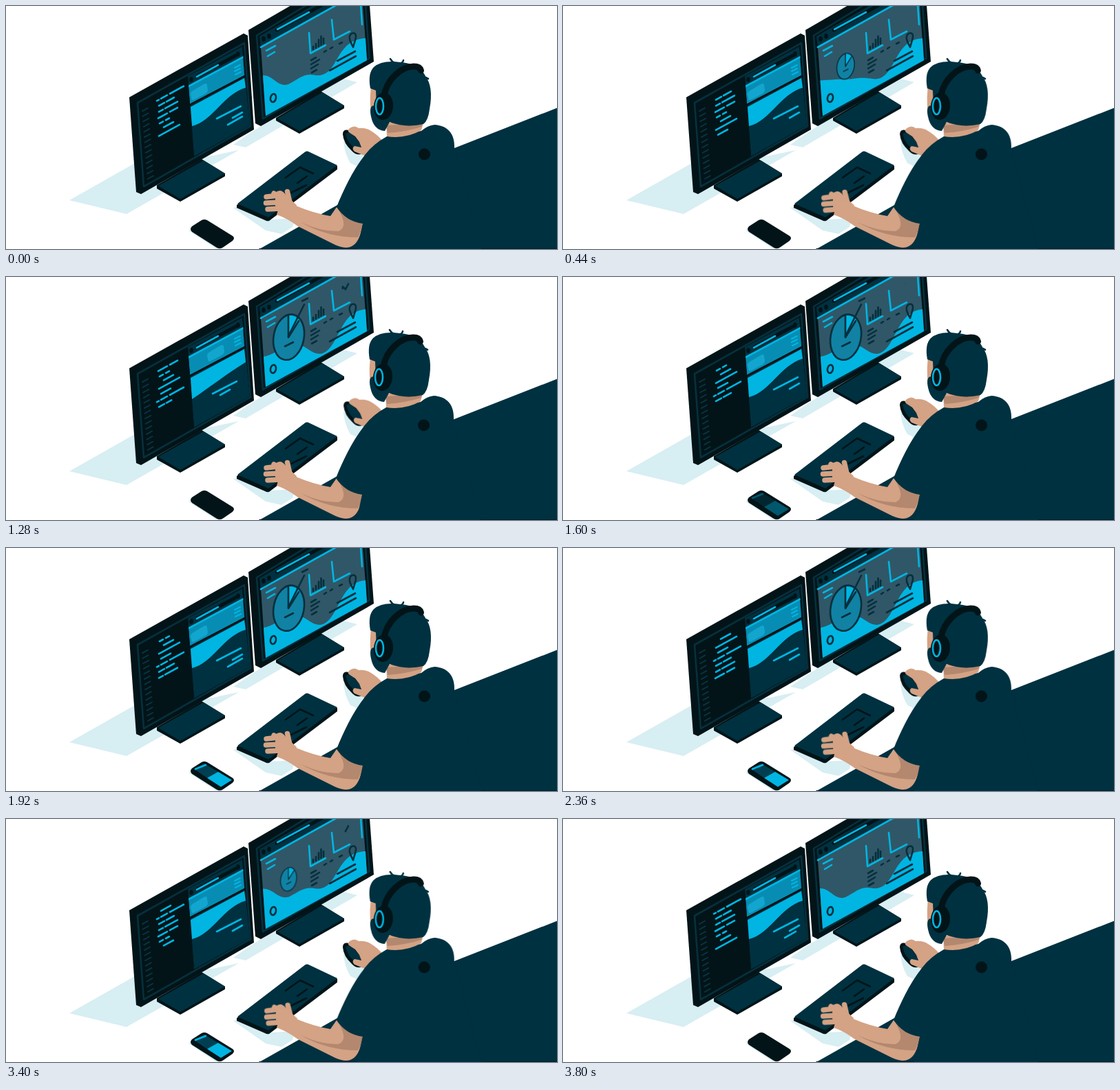
These frames come from a looping animation (800 px wide and 354 px high, 3.84 s). An HTML page:

```html
<!DOCTYPE html>
<html lang="en">
<head>
<meta charset="utf-8">
<title>Developer at work</title>
<style>
  html, body { margin: 0; width: 100%; height: 100%; overflow: hidden; background: #fff; }
  svg { display: block; width: 100%; height: 100%; }
  .navy { fill: #003140; }
  .ink { fill: #021418; }
  .cyan { fill: #00b5e2; }
  .shade { fill: #d7eef3; }
  .skin { fill: #d4a284; }
  .dim { fill: #b3886f; }
  .line { fill: none; stroke-linecap: round; stroke-linejoin: round; stroke-width: 2.6; }
  .c { stroke: #00b5e2; }
  .k { stroke: #021418; }
  .n { stroke: #06303e; }
  .s { stroke: #d4a284; }

  .card, .hero, .text path, .tick, .mouse, .body { animation: 1920ms infinite ease-in-out; }
  .card { animation-name: card; }
  .hero { animation-name: hero; }
  .text path { stroke-dasharray: 100; }
  .text .t1 { animation-name: t1; }
  .text .t2 { animation-name: t2; }
  .text .t3 { animation-name: t3; }
  .tick { stroke-dasharray: 100 300; animation-name: tick; animation-timing-function: linear; }
  .mouse { animation-name: mouse; }
  .body { animation-name: sway; }
  .sea { animation: sea 3840ms infinite ease-in-out; }
  .typing { transform-origin: 425px 300px; animation: typing 320ms infinite ease-in-out; }
  .pie { transform-origin: 410px 88px; animation: pie 3840ms infinite ease-in-out; }
  .lead, .tag { stroke-dasharray: 100; animation: lead 3840ms infinite ease-in-out; }
  .tag { animation-name: tag; }
  .lit { animation: lit 3840ms infinite linear; }

  @keyframes card { 0%, 23%, 77%, 100% { transform: none; } 37%, 68% { transform: translate(24px, -14px); } }
  @keyframes hero {
    0%, 23%, 77%, 100% { d: path("M268 147L346 105L348 119C316 128 300 168 270 175Z"); }
    37%, 68% { d: path("M268 147L346 105L348 124C322 140 298 159 270 178Z"); }
  }
  @keyframes t1 { 0%, 23%, 77%, 100% { transform: none; } 40%, 46% { transform: translate(-3px, 2px); } 67% { transform: translate(-6px, 6px); } }
  @keyframes t2 { 0%, 23%, 77%, 100% { transform: none; } 40%, 67% { transform: translate(-18px, 9px); } }
  @keyframes t3 { 0% { stroke-dashoffset: 0; } 20%, 94% { stroke-dashoffset: 101; opacity: 0; } 95% { opacity: 1; } 100% { stroke-dashoffset: 0; } }
  @keyframes tick {
    0%, 32% { stroke-dasharray: 0 300; stroke-dashoffset: 1; opacity: 0; }
    33% { stroke-dasharray: 0 300; stroke-dashoffset: 0; opacity: 1; }
    45% { stroke-dasharray: 60 300; stroke-dashoffset: 0; }
    66% { stroke-dasharray: 38 300; stroke-dashoffset: -62; opacity: 1; }
    77% { stroke-dasharray: 20 300; stroke-dashoffset: -80; opacity: 1; }
    84%, 100% { stroke-dasharray: 0 300; stroke-dashoffset: -101; opacity: 0; }
  }
  @keyframes sea {
    0%, 3%, 90%, 100% { d: path("M373 101C389 101 394 119 410 114C426 106 432 97 450 101C484 104 476 49 522 47L524 79L377 160Z"); }
    20%, 80% { d: path("M374 116C390 114 408 94 426 99C438 102 444 112 456 112C484 108 482 50 522 47L524 79L377 160Z"); }
  }
  @keyframes mouse { 0%, 20%, 77%, 100% { transform: none; } 44%, 47% { transform: translate(4px, 1px); } 62% { transform: translate(1.5px, 1px); } }
  @keyframes sway { 0%, 14%, 84%, 100% { transform: none; } 44%, 66% { transform: translate(-1px, 0); } }
  @keyframes typing { 0%, 100% { transform: none; } 50% { transform: translate(1.5px, .5px) rotate(-1.5deg); } }
  @keyframes pie { 0%, 5% { transform: scale(0); } 17%, 84% { transform: none; } 88.5% { transform: scale(.52); } 94%, 100% { transform: scale(0); } }
  @keyframes lead { 0%, 14% { stroke-dashoffset: 101; opacity: 0; } 15% { opacity: 1; } 22%, 70% { stroke-dashoffset: 0; } 79% { opacity: 1; } 82%, 100% { stroke-dashoffset: 101; opacity: 0; } }
  @keyframes tag { 0%, 22% { stroke-dashoffset: 101; opacity: 0; } 23% { opacity: 1; } 30%, 64% { stroke-dashoffset: 0; } 70% { opacity: 1; } 71%, 100% { stroke-dashoffset: 101; opacity: 0; } }
  @keyframes lit { 0%, 40% { opacity: 0; } 44%, 92% { opacity: 1; } 96%, 100% { opacity: 0; } }
</style>
</head>
<body>
<svg viewBox="0 0 800 354" preserveAspectRatio="none">
  <defs>
    <clipPath id="page"><path d="M264 102L343 59L354 174L273 219Z"/></clipPath>
  </defs>

  <g class="shade">
    <path d="M92 283L187 229L300 218L338 210L175 303Z"/>
    <path d="M330 202L362 180L490 106L510 111L348 206Z"/>
    <path d="M330 294L345 291L384 311L420 309L416 322L400 332L377 327Z"/>
    <path d="M265 327L272 326L314 353L304 353Z"/>
    <path d="M490 196L520 216L511 234L500 229Q491 214 490 196Z"/>
  </g>

  <!-- stands -->
  <path class="ink" d="M219 261L284 223L318 244V248L253 285L219 266Z"/>
  <path class="navy" d="M221 262L287 225L318 244L253 281Z"/>
  <path class="ink" d="M392 163L457 124L491 145V149L426 186L392 167Z"/>
  <path class="navy" d="M394 164L459 126L491 145L426 182Z"/>

  <!-- left monitor -->
  <path class="ink" d="M179 133L345 40L351 43L360 180L196 274L189 271Z"/>
  <path class="line n" stroke-linejoin="miter" d="M191 141L346 54L355 175L200 263Z"/>
  <g id="gutter" class="line" stroke="#0a323f" style="stroke-width:2"></g>
  <path id="code" class="line c"/>
  <g clip-path="url(#page)">
    <path class="navy" d="M264 102L343 59L354 174L273 219Z"/>
    <path fill="#078db3" d="M265 117L344 74L346 101L267 143Z"/>
    <path class="card" fill="#12a6cf" d="M272 123L287 114Q292 111 292 116L293 122Q293 126 289 128L274 136Q269 139 269 133L268 129Q268 125 272 123Z"/>
    <path class="hero cyan" d="M268 147L346 105L348 119C316 128 300 168 270 175Z"/>
    <path class="line k" d="M267 144L347 102"/>
    <path class="line c" d="M265 117L345 74"/>
    <path class="line c" style="stroke-width:2" d="M332 90L340 86M332 95L340 91M333 100L341 96"/>
  </g>
  <path class="line k" style="stroke-width:5" d="M278 102L334 72"/>
  <path class="line c" d="M277 103L308 86"/>
  <g class="ink"><ellipse cx="269" cy="107" rx="2.800" ry="3.800"/><ellipse cx="337" cy="70" rx="2.800" ry="3.800"/></g>
  <g class="text line c">
    <path class="t1" pathLength="100" d="M306 164L341 146"/>
    <path class="t2" pathLength="100" d="M329 163L343 155"/>
    <path class="t3" pathLength="100" d="M322 173L343 161"/>
  </g>

  <!-- right monitor -->
  <path class="ink" d="M352 35L414 -1H528L534 81L370 175L362 171Z"/>
  <path class="line n" d="M364 43L436 -1M522 -1L527.500 76L373 164L364 43"/>
  <path class="navy" d="M368 44L446 -1H518L522 60L371 70Z"/>
  <path fill="#305767" d="M370 60L479 -1H518L524 79L377 160Z"/>
  <path class="sea cyan" d="M373 101C389 101 394 119 410 114C426 106 432 97 450 101C484 104 476 49 522 47L524 79L377 160Z"/>
  <path class="line c" d="M370 60L479 -1"/>
  <path class="line k" style="stroke-width:5" d="M393 35L458 -1"/>
  <path class="line c" d="M394 34L440 9"/>
  <g class="ink"><ellipse cx="374" cy="48" rx="2.800" ry="3.800"/><ellipse cx="382" cy="44" rx="2.800" ry="3.800"/></g>
  <path class="line c" d="M378 65L391 58M380 73L390 67M515 -2L517 27M440 39L442 69L464 57M473 20L476 49L499 37"/>
  <path class="line n" d="M446 63V59M450 61V55M454 59V49M457.500 57V44M461 55V47"/>
  <path class="line n" d="M443 79L450 75M443 85L455 78M443 91L453 85M444 97L451 93M462 67L465 65M471 62L474 60M484 55L488 53"/>
  <path class="line n" d="M481 80L507 66M470 94L508 73"/>
  <path class="line n" d="M504 60C500 52 498 48 499 44C501 38 508 38 508 44C508 49 505 55 504 60Z"/>
  <ellipse class="line n" cx="388" cy="134" rx="4" ry="6" transform="rotate(12 388 134)"/>
  <path class="tick line n" pathLength="100" d="M482 35L486 40L489 14L493 18L497 10"/>
  <g class="pie">
    <ellipse cx="410.500" cy="87.500" rx="22" ry="33.500" fill="#1182a4" stroke="#06303e" stroke-width="2.600" transform="rotate(11 410 88)"/>
    <path class="cyan" d="M410 88L410 56Q420 55 426 64Z"/>
    <path class="line n" d="M410 88L410 56M410 88L425 64M405 101L417 95"/>
  </g>
  <path class="lead line n" pathLength="100" d="M410 86L433 40"/>
  <path class="tag line n" pathLength="100" d="M430 35L438 31"/>

  <!-- keyboard and phone -->
  <path class="ink" d="M335 290L434 213L481 233V238L382 313Q379 314 376 312L335 294Z"/>
  <path class="navy" d="M336 288L435 212Q437 211 439 212L481 232L381 308Z"/>
  <path class="line k" d="M406 250L427 235L446 244M414 272L436 261M423 258L437 248"/>
  <path class="ink" d="M270 321L284 312Q288 310 292 312L329 335Q333 338 329 342L316 351Q311 355 306 352L270 329Q266 325 270 321Z"/>
  <g class="lit">
    <path fill="#003f52" d="M273 322L288 314L308 326L292 335Z"/>
    <path class="cyan" d="M292 335L308 326L328 338L312 348Z"/>
    <path class="line c" d="M275 322L290 316"/>
  </g>

  <!-- floor -->
  <path class="navy" d="M368 354L481 290L600 226L651 207L800 148.500V354Z"/>
  <path fill="#011e29" d="M368 353H800V354H367Z"/>

  <!-- mouse hand -->
  <g class="mouse">
    <path class="ink" d="M489 187C489 179 496 179 504 184L522 202L518 215Q509 219 502 211Q490 200 489 187Z"/>
    <path class="navy" d="M493 186Q498 182 504 188L517 203L510 210Q496 202 493 186Z"/>
    <path class="skin" d="M499 178Q506 173 512 178Q522 177 530 182Q540 188 547 197L540 210L523 219L506 212Q501 207 506 204L516 206L513 198L507 190L498 184Q495 181 499 178Z"/>
  </g>

  <!-- typing arm -->
  <path class="skin" d="M400 280L421 291Q447 302 471 306L480 293L518 317Q514 344 502 350Q494 355 478 348L424 321Q408 309 393 304Z"/>
  <path class="dim" d="M428 315Q458 329 483 328Q497 322 484 299L518 317Q516 328 511 337Q466 337 428 315Z"/>
  <g class="typing">
    <path class="skin" d="M391 272Q399 265 406 275L422 290L416 311L398 304L391 293Z"/>
    <path class="line s" style="stroke-width:7.500" d="M378 278L395 276M377.500 287L396 286M380 296L398 295M408.500 270.500L412 286M389 273L404 281"/>
  </g>

  <!-- person -->
  <g class="body">
    <path class="navy" d="M480 293C489 270 503 240 521 217Q533 201 553 190L603 182Q612 174 622 173C641 174 652 186 651 207L690 354H510L518 317Q494 314 480 293Z"/>
    <path class="skin" d="M552 170L607 166L603 181Q580 194 553 190Z"/>
    <path class="dim" d="M552 174L606 170L603 176Q582 183 554 185Z"/>
    <path class="skin" d="M531 111Q527 133 530 156L549 168V115Z"/>
    <path class="navy" d="M529 120Q525 98 534 89Q546 78 573 82Q600 84 609 102Q621 118 615 150Q613 167 606 172Q580 178 557 169L550 182Q534 181 530 161Q527 147 533 145L538 148L537 123Z"/>
    <path class="line" stroke="#003140" d="M565 83Q560 81 558 77M574 83Q577 81 577 79M604 104Q610 103 613 106"/>
    <path class="line k" style="stroke-width:9" d="M549 130C553 108 573 88 592 88Q601 88 602.500 94"/>
    <ellipse class="ink" cx="548" cy="146" rx="14" ry="20" transform="rotate(5 548 146)"/>
    <ellipse class="line c" cx="542.500" cy="146" rx="5.500" ry="12"/>
    <circle class="ink" cx="607.500" cy="216" r="8.500"/>
  </g>
</svg>
<script>
  const LOOP = 3840, SLOPE = .55, STEP = 8.8;
  const rows = [
    [[6, 20]], [[0, 3], [6, 15], [19, 39]], [[3, 11], [14, 25]], [[3, 9], [12, 30]],
    [[2, 15], [19, 30]], [[4, 9], [13, 18]], [[10, 24]], [[3, 33]]
  ];
  const code = document.getElementById('code');
  const clamp = v => Math.max(0, Math.min(1, v));

  // Draws one slanted row of dashes, cut at the typed width.
  const dashes = (row, y, limit) => row
    .filter(([a]) => a < limit)
    .map(([a, b]) => {
      const end = Math.min(b, limit);
      return `M${219 + a} ${y - a * SLOPE}L${219 + end} ${y - end * SLOPE}`;
    }).join('');

  let marks = '';
  for (let i = 0; i < 14; i++) {
    const x = 198 + i * .6, y = 153 + i * 7.6;
    marks += `<path d="M${x} ${y}l8 -4.4"/>`;
  }
  document.getElementById('gutter').innerHTML = marks;

  function draw(now) {
    const n = rows.length;
    const p = (now % LOOP) / LOOP * n + n - 1 + .65;
    const last = Math.floor(p), part = p - last;
    const shift = clamp((part - .7) / .3);
    let d = '';
    for (let i = 0; i < n; i++) {
      const y = 191 - (i + shift) * STEP;
      if (y < 136) continue;
      d += dashes(rows[(last - i + n) % n], y, i ? 99 : clamp(part / .6) * 40);
    }
    code.setAttribute('d', d);
    requestAnimationFrame(draw);
  }
  draw(performance.now());
</script>
</body>
</html>
```
